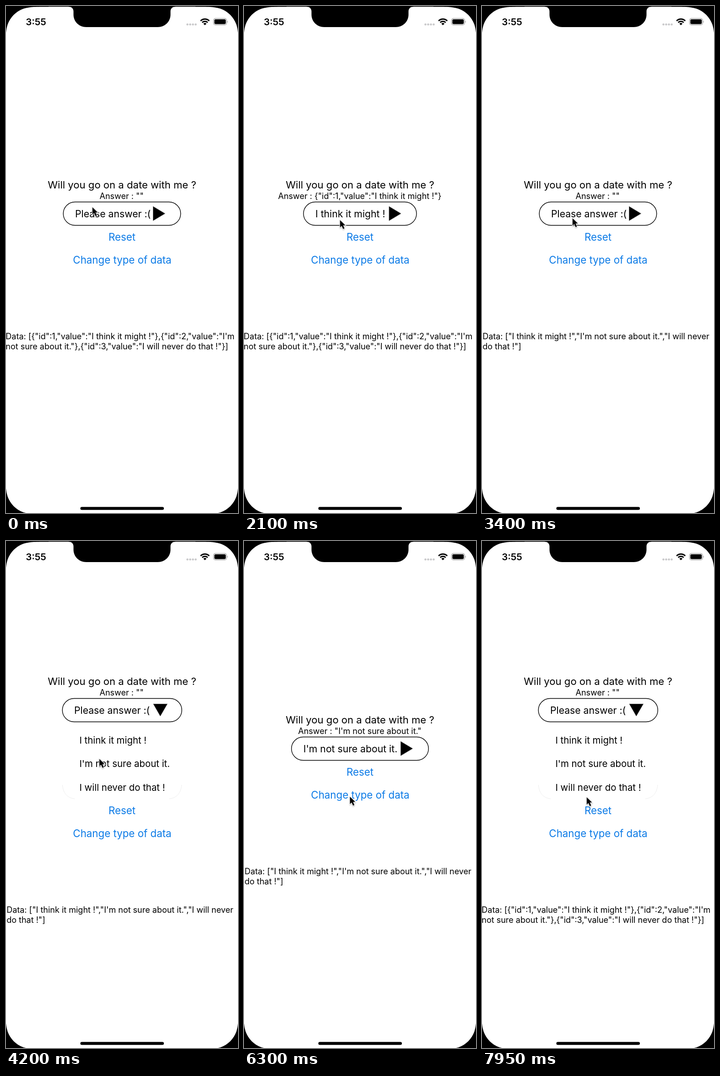
An HTML page that plays this animation: 507x1106 px, repeating every 8000 ms.

```html
<!DOCTYPE html>
<html lang="en">
<head>
<meta charset="utf-8">
<title>Dropdown demo</title>
<style>
html, body { margin: 0; width: 100%; height: 100%; overflow: hidden; background: #000; }
svg { display: block; width: 507px; height: 1106px; font-family: Inter, "Liberation Sans", sans-serif; font-optical-sizing: none; }

.mid { text-anchor: middle; }
.title { font-size: 22.1px; }
.link { font-size: 22.3px; fill: #0b7ae6; }
.small { font-size: 18px; }
.label { font-size: 21.2px; }
.item { font-size: 20.4px; }
.time { font-size: 20.5px; font-weight: 600; }
.pill { fill: none; stroke: #000; stroke-width: 1.4; }

.head, .foot, .empty, .open, .think, .sure, .blank, .objects, .array { animation: 8s step-end infinite; }
.press, .pick1, .pick2, .change { animation: 8s linear infinite; }
.cursor { animation: cursor 8s ease-in-out infinite; }

/* layout: the list pushes the header up and the footer down */
.head { animation-name: head; }
.foot { animation-name: foot; }
@keyframes head {
  0%, 16.875%, 58.125% { transform: none; }
  10%, 48.75%, 92.5%, 100% { transform: translateY(-84px); }
}
@keyframes foot {
  0%, 16.875%, 58.125% { transform: none; }
  10%, 48.75%, 92.5%, 100% { transform: translateY(84px); }
}

/* states */
.empty { animation-name: empty; }
.open { animation-name: open; }
.think { animation-name: think; }
.sure { animation-name: sure; }
.blank { animation-name: blank; }
.objects { animation-name: objects; }
.array { animation-name: array; }
@keyframes empty {
  0%, 36.25%, 85.625% { visibility: visible; }
  10%, 48.75%, 92.5%, 100% { visibility: hidden; }
}
@keyframes open {
  0%, 16.875%, 58.125% { visibility: hidden; }
  10%, 48.75%, 92.5%, 100% { visibility: visible; }
}
@keyframes think {
  0%, 36.25%, 100% { visibility: hidden; }
  16.875% { visibility: visible; }
}
@keyframes sure {
  0%, 85.625%, 100% { visibility: hidden; }
  58.125% { visibility: visible; }
}
@keyframes blank {
  0%, 36.25%, 85.625%, 100% { visibility: visible; }
  16.875%, 58.125% { visibility: hidden; }
}
@keyframes objects {
  0%, 85.625%, 100% { visibility: visible; }
  36.25% { visibility: hidden; }
}
@keyframes array {
  0%, 85.625%, 100% { visibility: hidden; }
  36.25% { visibility: visible; }
}

/* touch feedback */
.press { animation-name: press; }
.pick1 { animation-name: pick1; }
.pick2 { animation-name: pick2; }
.change { animation-name: change; }
@keyframes press {
  0%, 8%, 12.3%, 46.7%, 51.5%, 90.5%, 95.2%, 100% { opacity: 1; }
  9.4%, 10%, 48%, 48.75%, 91.8%, 92.5% { opacity: .2; }
}
@keyframes pick1 {
  0%, 14.2%, 17%, 100% { opacity: 1; }
  15.8%, 16.9% { opacity: .2; }
}
@keyframes pick2 {
  0%, 55.4%, 58.3%, 100% { opacity: 1; }
  57%, 58.2% { opacity: .2; }
}
@keyframes change {
  0%, 33.6%, 39.4%, 82.4%, 88.5%, 100% { opacity: 1; }
  35.4%, 36.25%, 82.6%, 85.6% { opacity: .2; }
}

@keyframes cursor {
  0% { transform: translate(188px, 437px); }
  3.125%, 8.75% { transform: translate(191px, 446px); }
  12.5%, 16.875% { transform: translate(209px, 449px); }
  21.25%, 26.25% { transform: translate(209px, 465px); }
  32.5%, 36.875% { transform: translate(201px, 571px); }
  42.5% { transform: translate(197px, 461px); }
  45%, 49.375% { transform: translate(194px, 450px); }
  53.75%, 58.75% { transform: translate(205px, 478px); }
  65%, 66% { transform: translate(219.5px, 512px); }
  72.5%, 74.375% { transform: translate(228px, 517px); }
  80%, 85.625% { transform: translate(231px, 560px); }
  88.5%, 93.75% { transform: translate(206px, 465px); }
  99.375%, 100% { transform: translate(228px, 557px); }
}
</style>
</head>
<body>
<svg viewBox="0 0 507 1106">
  <defs>
    <path id="arrow" d="M0 0L26 15.5L0 31Z" stroke="#555" stroke-width=".8"/>
    <path id="corner" d="M-4 -4H94V0C66.9 0 53.4 0 38.8 4.6C22.9 10.4 10.4 22.9 4.6 38.8C0 53.4 0 66.9 0 94H-4Z"/>
    <filter id="shade" x="-50%" y="-50%" width="200%" height="200%">
      <feDropShadow dx="0" dy="1.5" stdDeviation="1.3" flood-opacity=".35"/>
    </filter>
  </defs>

  <!-- screen and bezel -->
  <rect width="507" height="1106" fill="#fff"/>
  <rect width="507" height="1.5"/>
  <use href="#corner" transform="translate(-1 1.5)"/>
  <use href="#corner" transform="translate(508 1.5) scale(-1 1)"/>
  <use href="#corner" transform="translate(-1 1109) scale(1 -1)"/>
  <use href="#corner" transform="translate(508 1109) scale(-1 -1)"/>
  <path d="M137 0V1.5C143.5 1.5 147.5 6 147.5 12V19C147.5 34 160 46 175 46H332C347 46 359.5 34 359.5 19V12C359.5 6 363.5 1.5 370 1.5V0Z"/>

  <!-- status bar -->
  <text class="time mid" x="65.5" y="42">3:55</text>
  <g fill="#c9c9cb">
    <circle cx="396.5" cy="40.3" r="2.3"/><circle cx="402.5" cy="40.3" r="2.3"/>
    <circle cx="408.5" cy="40.3" r="2.3"/><circle cx="414.5" cy="40.3" r="2.3"/>
  </g>
  <g fill="none" stroke="#000" stroke-width="2.9">
    <path d="M425.2 32.4A13.4 13.4 0 0 1 444.2 32.4"/>
    <path d="M428.7 36A8.4 8.4 0 0 1 440.7 36"/>
  </g>
  <path d="M434.7 42L431.3 38.5A4.8 4.8 0 0 1 438.1 38.5Z"/>
  <rect x="453.4" y="27.2" width="28.8" height="14.2" rx="4.4" fill="none" stroke="#9a9a9a" stroke-width="1.2"/>
  <rect x="455.3" y="29.1" width="25" height="10.4" rx="2.7"/>
  <path d="M483.7 32Q486 34.3 483.7 36.8Z" fill="#9a9a9a"/>
  <rect x="162.5" y="1092.8" width="182.5" height="6.5" rx="3.2"/>

  <g class="head">
    <text class="title mid" x="253.5" y="397.7">Will you go on a date with me ?</text>
    <g class="small mid">
      <text class="blank" x="252.7" y="421.3">Answer : ""</text>
      <text class="think" x="253" y="421.3">Answer : {"id":1,"value":"I think it might !"}</text>
      <text class="sure" x="253" y="421.3">Answer : "I'm not sure about it."</text>
    </g>
    <g class="press">
      <g class="empty">
        <rect class="pill" x="125.2" y="427.5" width="256.5" height="51" rx="25.5"/>
        <text class="label" x="151" y="460.7">Please answer :(</text>
        <use href="#arrow" x="321.5" y="437.3"/>
      </g>
      <g class="open">
        <rect class="pill" x="123.2" y="427.5" width="261" height="51" rx="25.5"/>
        <text class="label" x="149" y="460.7">Please answer :(</text>
        <path d="M322 439.5H352.5L337.2 466Z" stroke="#555" stroke-width=".8"/>
      </g>
      <g class="think">
        <rect class="pill" x="130" y="427.5" width="247" height="51" rx="25.5"/>
        <text class="label" x="156" y="460.7">I think it might !</text>
        <use href="#arrow" x="317" y="437.3"/>
      </g>
      <g class="sure">
        <rect class="pill" x="103.7" y="427.5" width="299.5" height="51" rx="25.5"/>
        <text class="label" x="129.8" y="460.7">I'm not sure about it.</text>
        <use href="#arrow" x="342.5" y="437.3"/>
      </g>
    </g>
  </g>

  <g class="open item">
    <path d="M123.2 532C125 551 135 561 150 562.3M384 532C382 551 372 561 357 562.3" fill="none" stroke="#ececec"/>
    <text class="pick1" x="160.4" y="441.5">I think it might !</text>
    <text class="pick2" x="160.4" y="493.2">I'm not sure about it.</text>
    <text x="160.4" y="545">I will never do that !</text>
  </g>

  <g class="foot">
    <g class="link mid">
      <text x="253.5" y="512.3">Reset</text>
      <text class="change" x="254" y="561.8">Change type of data</text>
    </g>
    <g class="small objects">
      <text x="-.7" y="726.8">Data: [{"id":1,"value":"I think it might !"},{"id":2,"value":"I'm</text>
      <text x="-.7" y="749.3">not sure about it."},{"id":3,"value":"I will never do that !"}]</text>
    </g>
    <g class="small array">
      <text x="1.2" y="726.8">Data: ["I think it might !","I'm not sure about it.","I will never</text>
      <text x="1.2" y="749.3">do that !"]</text>
    </g>
  </g>

  <g class="cursor">
    <path transform="translate(.8 1.8) scale(.83)" d="M0 0V19.6L4.5 15.4L8.1 23.6L11.8 22L8.2 14H14.2Z" stroke="#fff" stroke-width="2.4" paint-order="stroke" filter="url(#shade)"/>
  </g>
</svg>
</body>
</html>
```
